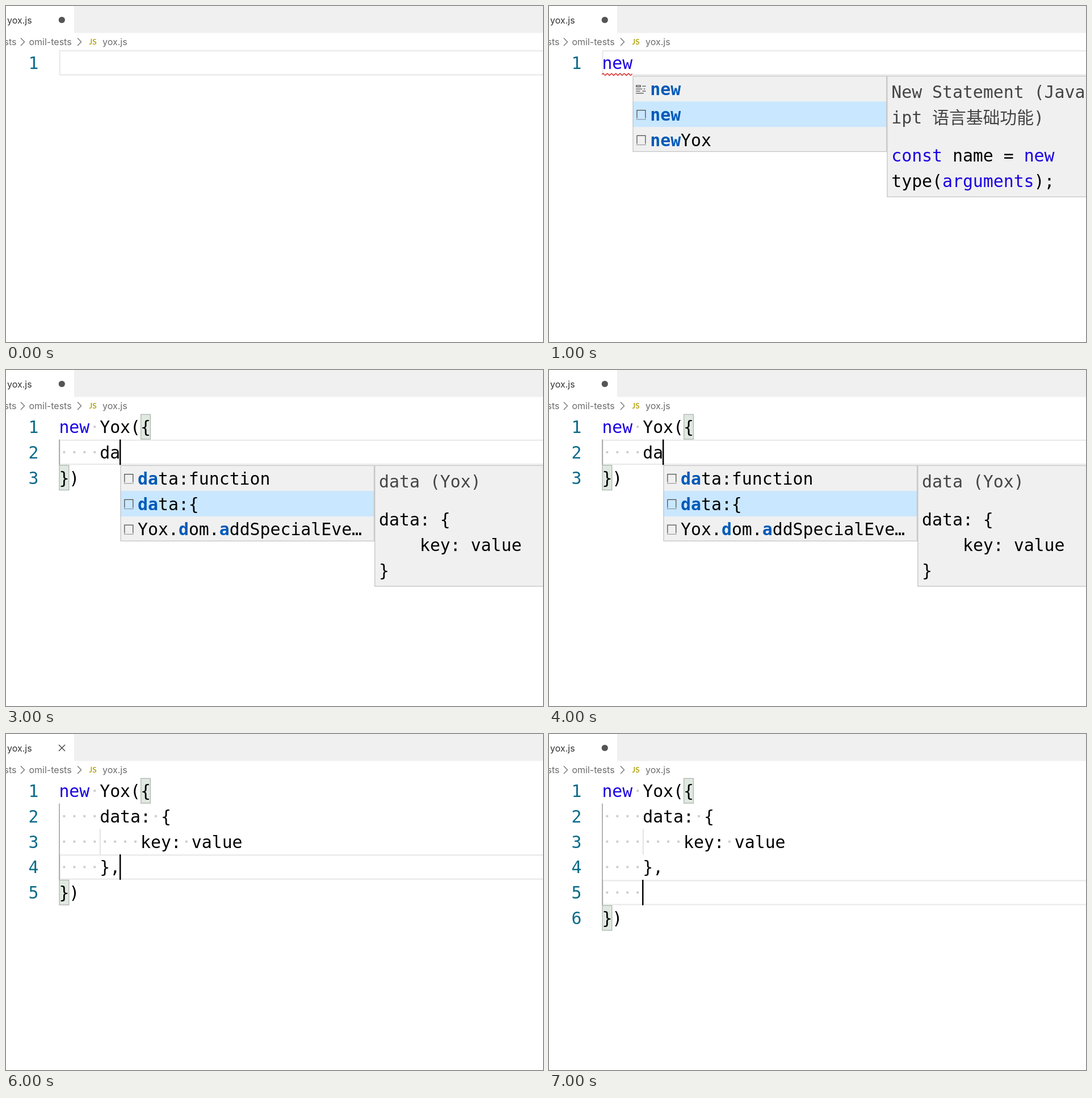
Animation of 946 by 592 pixels, one loop 8 s. Source, as an HTML page with a canvas:

```html
<!DOCTYPE html>
<html lang="en">
<head>
<meta charset="utf-8">
<title>Editor autocompletion</title>
<style>
  html, body { margin: 0; width: 100%; height: 100%; overflow: hidden; background: #fff; }
  canvas { display: block; }
</style>
</head>
<body>
<canvas id="stage" width="946" height="592"></canvas>
<script>
const ctx = document.getElementById('stage').getContext('2d');
const WIDTH = 946, HEIGHT = 592, STEP = 1000;
const LEFT = 93.4, TOP = 77.7, ROW = 44.8, CHAR = 17.953, UNIT = 1.244;
const MONO = '29.82px "DejaVu Sans Mono", "Noto Sans CJK SC", "Noto Sans CJK", monospace';
const UI = '16px Inter, sans-serif';
const BLACK = '#000', KEYWORD = '#1a00e2', MATCH = '#005ab8', GREY = '#444', PANEL = '#f0f0f0';

const colX = col => LEFT + col * CHAR;
const rowY = row => TOP + row * ROW;

function box(x, y, w, h, color) {
  ctx.fillStyle = color;
  ctx.fillRect(x, y, w, h);
}

function frame(x, y, w, h, color, line = UNIT) {
  ctx.strokeStyle = color;
  ctx.lineWidth = line;
  ctx.strokeRect(x + line / 2, y + line / 2, w - line, h - line);
}

function path(points, color, line) {
  ctx.strokeStyle = color;
  ctx.lineWidth = line;
  ctx.beginPath();
  points.forEach(([x, y]) => ctx.lineTo(x, y));
  ctx.stroke();
}

function disc(x, y, r, color) {
  ctx.fillStyle = color;
  ctx.beginPath();
  ctx.arc(x, y, r, 0, Math.PI * 2);
  ctx.fill();
}

function label(text, x, y, color, font = UI, align = 'left') {
  ctx.font = font;
  ctx.fillStyle = color;
  ctx.textAlign = align;
  ctx.fillText(text, x, y);
  ctx.textAlign = 'left';
}

// Each word starts on its own character cell.
function mono(text, x, y, color = BLACK, bold = false) {
  for (const word of text.matchAll(/\S+/g))
    label(word[0], x + word.index * CHAR, y, color, (bold ? 'bold ' : '') + MONO);
}

// Runs are strings, or [text, color, bold] for styled parts.
function runs(parts, x, y) {
  for (const part of parts) {
    const [text, color, bold] = [].concat(part);
    mono(text, x, y, color, bold);
    x += text.length * CHAR;
  }
}

const match = text => [text, MATCH, true];
const keyword = text => [text, KEYWORD];

function chrome(saved) {
  box(0, 0, WIDTH, HEIGHT, '#fff');
  box(120, 0, WIDTH - 120, 47.5, PANEL);
  label('yox.js', 2, 31, '#333');
  if (saved) {
    path([[93, 19], [104, 30]], '#444', 1.4);
    path([[104, 19], [93, 30]], '#444', 1.4);
  } else disc(98.3, 24.5, 5.6, '#555');
  label('sts', 18.5, 69, '#6c6c6c', UI, 'right');
  label('omil-tests', 40.5, 69, '#6c6c6c');
  label('yox.js', 170, 69, '#6c6c6c');
  label('JS', 146.5, 68.3, '#b5a71c', 'bold 13.5px Lato, sans-serif');
  for (const x of [26, 126])
    path([[x, 56.5], [x + 6.5, 63.3], [x, 70]], '#777', 1.4);
}

function codeLine(text, row) {
  const y = rowY(row) + 33.2;
  mono(String(row + 1), colX(-3), y, '#0a6b89');
  for (const space of text.matchAll(/ /g))
    box(colX(space.index + 0.5) - 1.9, rowY(row) + 20.4, 3.8, 3.8, '#ccc');
  const head = text.startsWith('new') ? 'new' : '';
  runs([keyword(head), text.slice(head.length)], LEFT, y);
}

function guide(col, from, to, color) {
  box(colX(col), rowY(from), UNIT, (to - from) * ROW, color);
}

function bracket(col, row) {
  box(colX(col), rowY(row), CHAR, ROW, '#dfe9e0');
  frame(colX(col), rowY(row), CHAR, ROW, '#b0b4b0');
}

function caret(col, row, color = BLACK) {
  box(colX(col) - 1.2, rowY(row), 2.5, ROW, color);
}

function selection(col, row, length, color) {
  ctx.fillStyle = color;
  ctx.beginPath();
  ctx.roundRect(colX(col), rowY(row), length * CHAR, ROW, 3);
  ctx.fill();
}

function squiggle(col, length, row) {
  const points = [];
  for (let i = 0; i <= length * CHAR; i++)
    points.push([colX(col) + i, rowY(row) + 42.8 - 1.6 * Math.sin(i * Math.PI * 2 / 7.46)]);
  path(points, '#e02020', 1.4);
}

function bulb(x, y) {
  disc(x, y, 6.5, '#dba108');
  box(x - 3, y + 4, 6, 8, '#dba108');
  box(x - 1.6, y + 7.5, 3.2, 2.8, '#fff');
}

function icon(kind, x, y) {
  ctx.save();
  ctx.translate(x, y);
  ctx.scale(UNIT, UNIT);
  const ink = '#4d4d4d';
  if (kind === 'keyword') {
    frame(1, 2, 7, 3, ink, 1);
    [[10, 3, 5], [1, 7, 9], [12, 7, 2], [1, 10, 6], [10, 10, 5], [1, 13, 11]]
      .forEach(([left, top, width]) => box(left, top, width, 1, ink));
  } else {
    path([[2.5, 13], [2.5, 1.5], [14.5, 1.5], [14.5, 13]], ink, 1);
    for (let left = 2; left < 15; left += 2) box(left, 14, 1, 1, ink);
  }
  ctx.restore();
}

function popup(col, row, items, notes) {
  const x = colX(col) + 0.2, y = rowY(row) + 0.4, width = 447.8, height = 134.2;
  box(x, y, width, height, PANEL);
  box(x, y + ROW + 0.6, width, ROW, '#c9e7ff');
  frame(x, y, width, height, '#c4c4c4');
  items.forEach(({ kind, parts }, i) => {
    icon(kind, x + 4.4, y + 14 + i * ROW);
    runs(parts, x + 30.8, y + 34 + i * ROW);
  });
  const side = x + width;
  box(side, y, WIDTH - side + 4, 214, PANEL);
  frame(side, y, WIDTH - side + 4, 214, '#c4c4c4');
  notes.forEach(({ parts, offset }) => runs(parts, side + 8, y + offset));
}

const newPopup = () => popup(3, 1, [
  { kind: 'keyword', parts: [match('new')] },
  { kind: 'snippet', parts: [match('new')] },
  { kind: 'snippet', parts: [match('new'), 'Yox'] }
], [
  { parts: [['New Statement (JavaScr', GREY]], offset: 39 },
  { parts: [['ipt 语言基础功能)', GREY]], offset: 83.8 },
  { parts: [keyword('const'), ' name = ', keyword('new')], offset: 151 },
  { parts: ['type(', keyword('arguments'), ');'], offset: 195.8 }
]);

const dataPopup = () => popup(6, 2, [
  { kind: 'snippet', parts: [match('da'), 'ta:function'] },
  { kind: 'snippet', parts: [match('da'), 'ta:{'] },
  { kind: 'snippet', parts: ['Yox.', match('d'), 'om.', match('a'), 'ddSpecialEve…'] }
], [
  { parts: [['data (Yox)', GREY]], offset: 39 },
  { parts: ['data: {'], offset: 106.2 },
  { parts: ['    key: value'], offset: 151 },
  { parts: ['}'], offset: 195.8 }
]);

const OPEN = 'new Yox({', DATA = ['    data: {', '        key: value'];
const DARK = '#858585', LIGHT = '#d3d3d3';

const typing = {
  lines: [OPEN, '    da', '})'], current: 1, pair: 2, caret: [6, 1],
  guides: [[0, 1, 2, DARK]], over: dataPopup
};

const scenes = [
  { lines: [''], current: 0 },
  { lines: ['new'], current: 0, over() { squiggle(0, 3, 0); newPopup(); } },
  { lines: [OPEN, '    ', '})'], current: 1, pair: 2, caret: [3, 1] },
  typing,
  typing,
  {
    lines: [OPEN, ...DATA, '    }', '})'], saved: true,
    guides: [[0, 1, 4, LIGHT], [4, 2, 3, LIGHT]],
    under() {
      selection(8, 2, 3, '#77ace2');
      selection(13, 2, 5, '#c8cfde');
    },
    over() {
      caret(5, 3, '#6f7fa8');
      bulb(110, 175);
    }
  },
  {
    lines: [OPEN, ...DATA, '    },', '})'], saved: true, current: 3, pair: 4, caret: [6, 3],
    guides: [[0, 1, 4, DARK], [4, 2, 3, LIGHT]]
  },
  {
    lines: [OPEN, ...DATA, '    },', '    ', '})'], current: 4, pair: 5, caret: [4, 4],
    guides: [[0, 1, 5, DARK], [4, 2, 3, LIGHT]]
  }
];

function draw(scene) {
  chrome(scene.saved);
  if (scene.current !== undefined)
    frame(LEFT, rowY(scene.current), WIDTH, ROW, '#ebebeb', 2.5);
  scene.under?.();
  if (scene.pair) {
    bracket(8, 0);
    bracket(0, scene.pair);
  }
  scene.guides?.forEach(args => guide(...args));
  scene.lines.forEach(codeLine);
  if (scene.caret) caret(...scene.caret);
  scene.over?.();
}

const start = performance.now();

function tick() {
  const elapsed = Math.max(0, performance.now() - start);
  draw(scenes[Math.floor(elapsed / STEP) % scenes.length]);
  requestAnimationFrame(tick);
}
tick();
</script>
</body>
</html>
```
